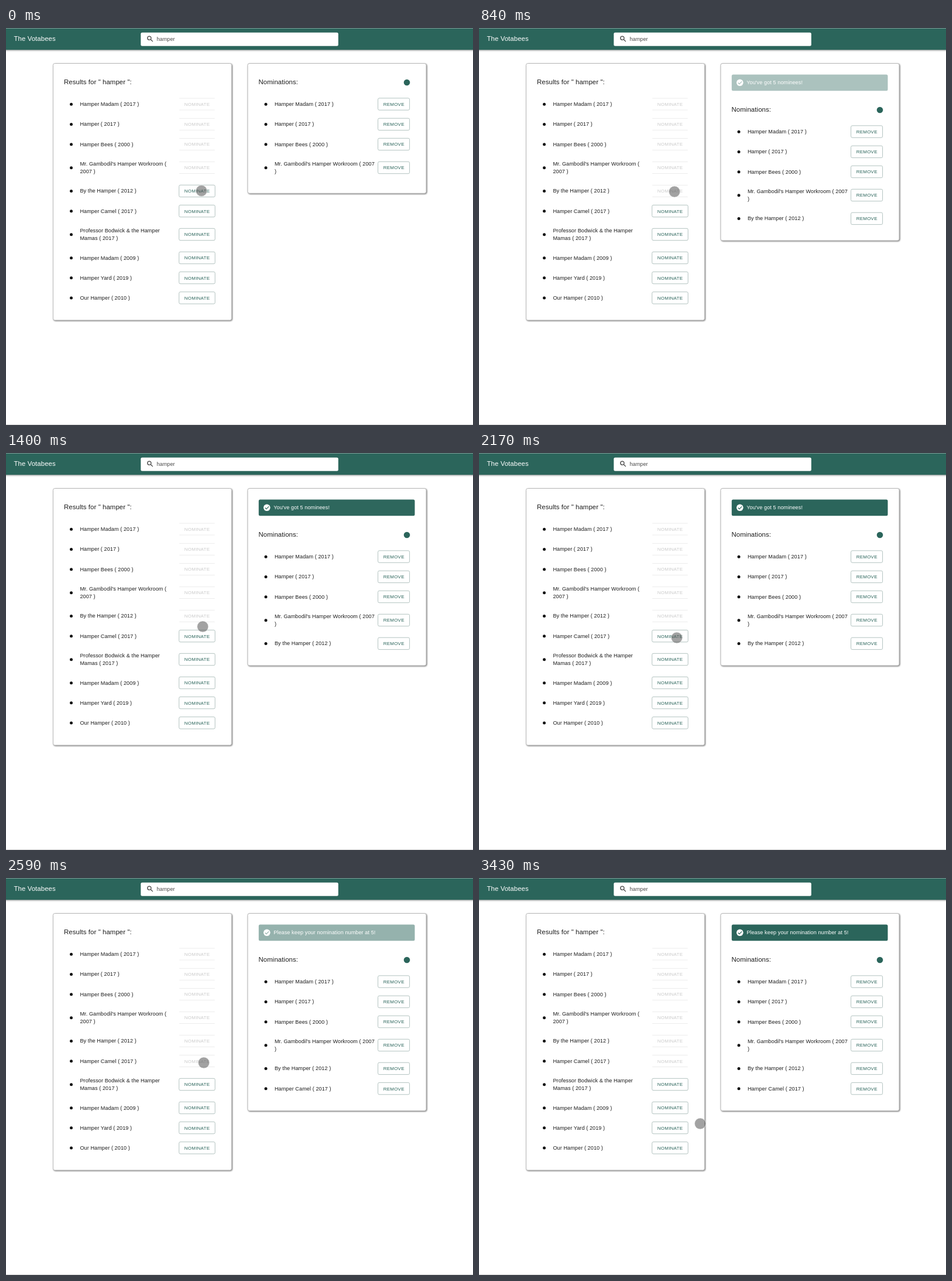
Recreate the animation shown at these times as an HTML page. Size 798 px wide and 678 px high, loop 3.5 s.

```html
<!DOCTYPE html>
<html lang="en">
<head>
<meta charset="utf-8">
<title>Nominations</title>
<style>
  html, body { margin: 0; width: 100%; height: 100%; overflow: hidden; background: #fff; }
  svg { display: block; width: 798px; height: 678px; }
  text { font: 9.11px "Liberation Sans", Arial, sans-serif; letter-spacing: .00938em; fill: #1c1c1c; white-space: pre; }
  .title { font-size: 11.4px; letter-spacing: .0075em; }
  .light { fill: #fff; }
  .label { font-size: 8px; letter-spacing: .0286em; fill: #2b655b; }
  .off .label { fill: #cbcbcb; }
  .off .frame { display: none; }
  .edge { display: none; stroke: #ececec; }
  .off .edge { display: inline; }
  .frame { fill: #fff; stroke: #b3c3c0; }
  .card { fill: #fff; stroke: #b9b9b9; filter: drop-shadow(1.8px 1.8px 1px #777); }
  .bar { fill: #2b655b; filter: drop-shadow(0 1.5px 1.5px rgba(0, 0, 0, .4)); }
  .green { fill: #2b655b; }
</style>
</head>
<body>
<svg id="stage" viewBox="0 0 798 678"></svg>
<script>
const LOOP = 3500, STEP = 70, FADE = 1050, SHIFT = 47;
const QUERY = 'hamper';
// centre of the row, lines in the results, lines in the nominations
const rows = [
  [130, ['Hamper Madam ( 2017 )']],
  [164.4, ['Hamper ( 2017 )']],
  [198.5, ['Hamper Bees ( 2000 )']],
  [238.5, ["Mr. Gambodil's Hamper Workroom (", '2007 )'], ["Mr. Gambodil's Hamper Workroom ( 2007", ')']],
  [278.4, ['By the Hamper ( 2012 )']],
  [312.6, ['Hamper Camel ( 2017 )']],
  [352.5, ['Professor Bodwick & the Hamper', 'Mamas ( 2017 )']],
  [392.5, ['Hamper Madam ( 2009 )']],
  [426.6, ['Hamper Yard ( 2019 )']],
  [460.9, ['Our Hamper ( 2010 )']]
];
// when each late row is nominated, and its message
const events = [
  { at: 490, fade: 515, row: 4, bottom: 363, text: "You've got 5 nominees!" },
  { at: 2240, fade: 2225, row: 5, bottom: 397.5, text: 'Please keep your nomination number at 5!' }
];
const path = [
  [0, 334, 278], [210, 334, 279.5], [1260, 334, 279.5], [1610, 339.5, 322],
  [1680, 339.5, 322], [2030, 338, 315.5], [3080, 338, 315.5], [3430, 378, 419.5], [3500, 378, 419.5]
];
const clicks = [350, 2030];

const stage = document.getElementById('stage');
function add(parent, tag, attrs, content) {
  const node = document.createElementNS('http://www.w3.org/2000/svg', tag);
  for (const key in attrs) node.setAttribute(key, attrs[key]);
  if (content) node.textContent = content;
  return parent.appendChild(node);
}
const group = parent => add(parent, 'g', {});
const box = (parent, x, y, width, height, rx, cls) =>
  add(parent, 'rect', { x, y, width, height, rx, class: cls });
const write = (parent, x, y, content, cls = '') =>
  add(parent, 'text', { x, y, class: cls }, content);
const show = (node, on) => node.setAttribute('visibility', on ? 'visible' : 'hidden');

function button(parent, x, y, width, label) {
  const g = group(parent);
  box(g, x, y - 10.2, width, 20.4, 2.3, 'frame');
  add(g, 'path', { d: `M${x + .5} ${y - 10}h${width - 1}m0 20h${1 - width}`, class: 'edge' });
  write(g, x + 9.1, y + 2.9, label, 'label');
  return g;
}
function entry(parent, x, y, lines) {
  const g = group(parent);
  add(g, 'circle', { cx: x, cy: y + .2, r: 2.5, fill: '#111' });
  const first = y + 3 - (lines.length - 1) * 7;
  lines.forEach((line, i) => write(g, x + 14.9, first + i * 13.8, line));
  return g;
}
function trash(parent, y) {
  return add(parent, 'path', {
    d: `M667.4 ${y - 4.7}h2.2l.7-.7h2.8l.7.7h2.2v1.2h-8.6zM668 ${y - 2.9}h7.4v7q0 1.3-1.3 1.3h-4.8q-1.3 0-1.3-1.3z`,
    class: 'green'
  });
}

box(stage, -5, -5, 808, 42.3, 0, 'bar');
box(stage, 0, 0, 798, 1, 0).setAttribute('fill', '#7d9c96');
box(stage, 0, 677, 798, 1, 0).setAttribute('fill', '#d2d2d2');
write(stage, 13.5, 22.4, 'The Votabees', 'title light');
box(stage, 230.3, 7.8, 337.5, 23, 2.5, 'light');
add(stage, 'path', {
  d: 'M248 17.2a3.1 3.1 0 1 1-6.2 0a3.1 3.1 0 1 1 6.2 0M247.2 19.5l3.6 3.6',
  fill: 'none', stroke: '#444', 'stroke-width': 1.3
});
write(stage, 257.4, 22, QUERY).setAttribute('fill-opacity', .8);

box(stage, 80.5, 60.5, 305, 438.5, 3, 'card');
write(stage, 99, 96, `Results for " ${QUERY} ":`, 'title');
const nominate = rows.map(([y, lines]) => {
  entry(stage, 111.5, y, lines);
  return button(stage, 295.7, y, 61.5, 'NOMINATE');
});

const card = box(stage, 413, 60.5, 305, 222, 3, 'card');
const list = group(stage);
write(list, 431.5, 96, 'Nominations:', 'title');
add(list, 'circle', { cx: 685, cy: 93, r: 5.3, class: 'green' });
const picks = rows.slice(0, 6).map(([y, lines, wide]) => {
  const g = entry(list, 444, y, wide || lines);
  return { g, bin: trash(g, y), remove: button(g, 635.6, y, 54, 'REMOVE') };
});

for (const e of events) {
  e.alert = group(stage);
  box(e.alert, 431.8, 79.4, 266.7, 27.8, 2.5, 'green');
  add(e.alert, 'circle', { cx: 445.8, cy: 93.3, r: 5.8, fill: '#fff' });
  add(e.alert, 'path', { d: 'M442.7 93.5l2.2 2.2l4.2-4.3', fill: 'none', stroke: '#2b655b', 'stroke-width': 1.2 });
  write(e.alert, 457.2, 96.2, e.text, 'light');
}
const cursor = group(stage);
const halo = add(cursor, 'circle', { r: 22.5, fill: '#555', 'fill-opacity': .12 });
add(cursor, 'circle', { r: 9.6, fill: '#555', 'fill-opacity': .55, stroke: '#fff', 'stroke-opacity': .5 });

// cubic-bezier(.4, 0, .2, 1)
function ease(x) {
  if (x <= 0) return 0;
  if (x >= 1) return 1;
  let lo = 0, hi = 1;
  for (let i = 0; i < 20; i++) {
    const s = (lo + hi) / 2, r = 1 - s;
    if (1.2 * r * r * s + .6 * r * s * s + s * s * s < x) lo = s; else hi = s;
  }
  return lo * lo * (3 - 2 * lo);
}
function locate(t) {
  const i = path.findIndex(p => p[0] > t), [t0, x0, y0] = path[i - 1], [t1, x1, y1] = path[i];
  const k = (t - t0) / (t1 - t0);
  return [x0 + (x1 - x0) * k, y0 + (y1 - y0) * k];
}
function draw(t) {
  const done = events.filter(e => t >= e.at), last = done[done.length - 1];
  nominate.forEach((b, i) => b.setAttribute('class', i < 4 + done.length ? 'off' : ''));
  list.setAttribute('transform', `translate(0 ${last ? SHIFT : 0})`);
  card.setAttribute('height', (last ? last.bottom : 282.3) - 60.5);
  picks.forEach(({ g, bin, remove }, i) => {
    const e = events.find(v => v.row === i), fresh = !!e && t < e.at + 2 * STEP;
    const shown = i < 4 + done.length;
    show(g, shown);
    show(bin, shown && fresh);
    show(remove, shown && !fresh);
  });
  for (const e of events) e.alert.setAttribute('opacity', e === last ? ease((t - e.fade) / FADE) : 0);
  cursor.setAttribute('transform', `translate(${locate(t)})`);
  show(halo, clicks.some(c => t >= c && t < c + 2 * STEP));
}
const start = performance.now();
function tick() {
  const t = (performance.now() - start) % LOOP;
  draw(Math.floor(t / STEP) * STEP);
  requestAnimationFrame(tick);
}
tick();
</script>
</body>
</html>
```
